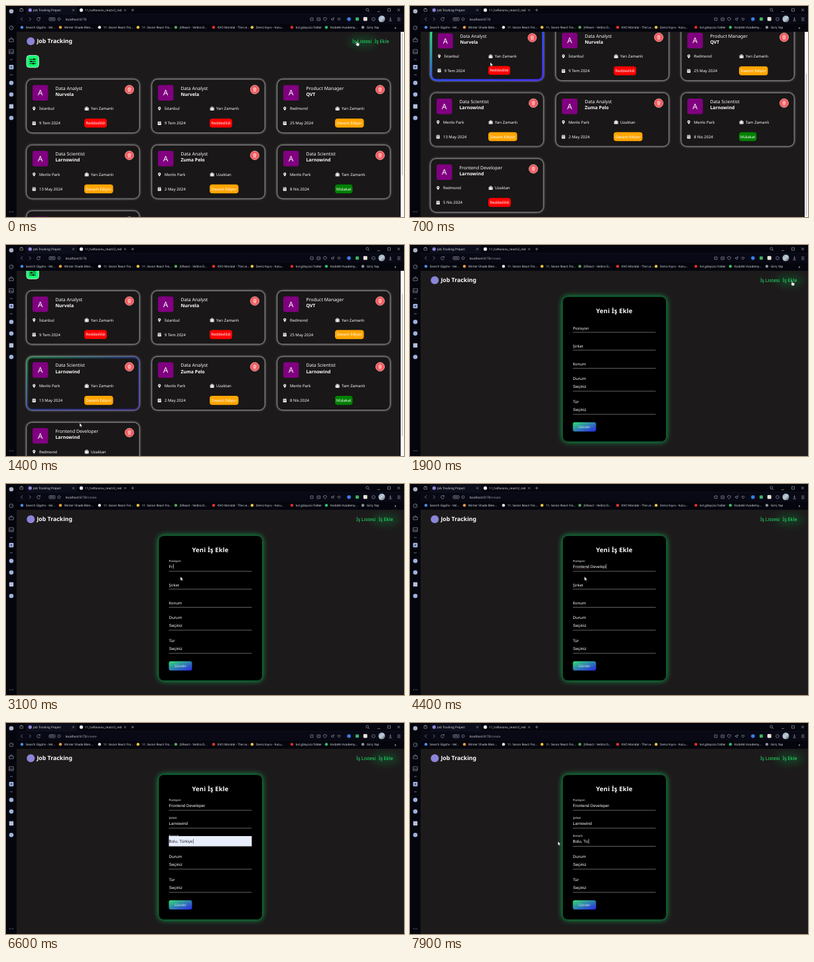
An HTML page that plays this animation: 600 by 319 pixels, repeating every 8 s.

```html
<!DOCTYPE html>
<html lang="tr">
<head>
<meta charset="utf-8">
<title>Job Tracking Project</title>
<style>
html, body { margin: 0; width: 100%; height: 100%; overflow: hidden; background: #1d1a1b; }
svg { display: block; width: 100vw; height: 100vh; font-family: "Noto Sans", sans-serif; font-weight: 500; fill: #fff; text-rendering: geometricPrecision; }
text { white-space: pre; }
.b { font-weight: 700; }
.ui { font-family: "Open Sans", sans-serif; fill: #eceef4; }
.input { font-family: "Liberation Sans", Arial, sans-serif; }
.mid { text-anchor: middle; }
.line { fill: none; stroke: #a9b0c4; stroke-width: .6; }
.nav { fill: #1fee6c; }
.glow { fill: #00c44e; filter: blur(6px); opacity: .2; }
.card { fill: #191717; filter: drop-shadow(0 0 1.6px #d0d0d0) drop-shadow(0 0 1.4px #8a8a8a); }
.panel { fill: #000; stroke: #0b7a3a; stroke-width: .7; filter: drop-shadow(0 0 4px #12a550); }
.ring { fill: none; stroke: url(#hue); stroke-width: 2.8; opacity: 0; }

.scroll, .thumb, .list, .form, .hand, .arrow, .pointer, .hover0, .hover3, .shrink0 { animation: 8s infinite; }
.scroll { animation-name: scroll; }
.thumb { animation-name: thumb; }
.list { animation-name: list; animation-timing-function: step-end; }
.form { animation-name: form; animation-timing-function: step-end; }
.hand { animation-name: hand; animation-timing-function: step-end; }
.arrow { animation-name: arrow; animation-timing-function: step-end; }
.pointer { animation-name: pointer; animation-timing-function: ease-in-out; }
.hover0 { animation-name: hover0; }
.hover3 { animation-name: hover3; }
.shrink0 { animation-name: shrink0; transform-origin: 85px 40px; }

@keyframes scroll {
  0%, 3.5% { transform: translateY(0); }
  7.75%, 13% { transform: translateY(-79px); animation-timing-function: ease-in; }
  17.5% { transform: translateY(-42px); animation-timing-function: ease-out; }
  20%, 100% { transform: translateY(0); }
}
@keyframes thumb {
  0%, 3.5% { transform: translateY(0); }
  7.75%, 13% { transform: translateY(61px); animation-timing-function: ease-in; }
  17.5% { transform: translateY(33px); animation-timing-function: ease-out; }
  20%, 100% { transform: translateY(0); }
}
@keyframes list { 0% { visibility: visible; } 23.1%, 100% { visibility: hidden; } }
@keyframes form { 0% { visibility: hidden; } 23.1%, 100% { visibility: visible; } }
@keyframes hand {
  0% { visibility: visible; } 2.5% { visibility: hidden; }
  22% { visibility: visible; } 28.5%, 100% { visibility: hidden; }
}
@keyframes arrow {
  0% { visibility: hidden; } 2.5% { visibility: visible; }
  22% { visibility: hidden; } 28.5% { visibility: visible; }
  78% { visibility: hidden; } 88.5%, 100% { visibility: visible; }
}
@keyframes pointer {
  0%, 1.5% { transform: translate(528px, 53px); }
  6%, 11% { transform: translate(121px, 85px); }
  13% { transform: translate(112px, 160px); }
  16.5%, 18% { transform: translate(111px, 269px); }
  22.2%, 27% { transform: translate(575px, 54px); }
  32.5%, 34.5% { transform: translate(268px, 125px); }
  37%, 60% { transform: translate(263px, 140px); }
  62%, 71% { transform: translate(262px, 151px); }
  73.5%, 88.5% { transform: translate(264px, 179px); }
  94%, 100% { transform: translate(223px, 179px); }
}
@keyframes hover0 { 0%, 5% { opacity: 0; } 7.5%, 11.5% { opacity: 1; } 14%, 100% { opacity: 0; } }
@keyframes hover3 { 0%, 12% { opacity: 0; } 14%, 15.5% { opacity: 1; } 17.5% { opacity: .4; } 19%, 100% { opacity: 0; } }
@keyframes shrink0 { 0%, 5% { transform: none; } 7.5%, 11.5% { transform: scale(.975); } 14%, 100% { transform: none; } }
</style>
</head>
<body>
<svg id="stage" viewBox="0 0 600 319"></svg>
<script>
const text = (x, y, size, str, cls = '', extra = '') =>
  `<text x="${x}" y="${y}" font-size="${size}" class="${cls}" ${extra}>${str}</text>`;
const box = (x, y, w, h, r, fill, extra = '') =>
  `<rect x="${x}" y="${y}" width="${w}" height="${h}" rx="${r}" fill="${fill}" ${extra}/>`;
const dot = (x, y, r, fill, extra = '') => `<circle cx="${x}" cy="${y}" r="${r}" fill="${fill}" ${extra}/>`;
const line = (d, extra = '') => `<path class="line" d="${d}" ${extra}/>`;
const at = (x, y, inner) => `<g transform="translate(${x} ${y})">${inner}</g>`;

const pin = '<path fill-rule="evenodd" d="M0 3C-1.4 1-2.1.2-2.1-.9A2.1 2.1 0 0 1 2.1-.9C2.1.2 1.4 1 0 3ZM0-1.7A.8.8 0 1 0 0-.1 .8.8 0 1 0 0-1.7Z"/>';
const briefcase = box(-3, -1.8, 6, 4.6, .7, '#fff') +
  '<path d="M-1.2-1.8V-2.8H1.2V-1.8" fill="none" stroke="#fff" stroke-width=".7"/><path d="M-1.6-1.8V2.8M1.6-1.8V2.8" stroke="#191717" stroke-width=".4"/>';
const calendar = box(-2.6, -2.1, 5.2, 5, .6, '#fff') +
  '<path d="M-1.3-3V-1.6M1.3-3V-1.6" stroke="#fff" stroke-width=".7"/><path d="M-2.6-.7H2.6M-1.6.8H1.6" stroke="#191717" stroke-width=".5"/>';
const trash = '<path d="M-2.5-2H2.5M-.8-2V-2.8H.8V-2M-1.9-2L-1.6 2.9H1.6L1.9-2M-.6-.8V1.8M.6-.8V1.8" fill="none" stroke="#fff" stroke-width=".6"/>';

const states = {
  Reddedildi: [34, '#ff0000'],
  'Devam Ediyor': [43.5, '#ffa500'],
  'Mülakat': [26.5, '#008000']
};
const jobs = [
  ['Data Analyst', 'Nurvela', 'İstanbul', 'Yarı Zamanlı', '9 Tem 2024', 'Reddedildi'],
  ['Data Analyst', 'Nurvela', 'İstanbul', 'Yarı Zamanlı', '9 Tem 2024', 'Reddedildi'],
  ['Product Manager', 'QVT', 'Redmond', 'Yarı Zamanlı', '25 May 2024', 'Devam Ediyor'],
  ['Data Scientist', 'Larnowind', 'Menlo Park', 'Yarı Zamanlı', '13 May 2024', 'Devam Ediyor'],
  ['Data Analyst', 'Zuma Pelo', 'Menlo Park', 'Uzaktan', '2 May 2024', 'Devam Ediyor'],
  ['Data Scientist', 'Larnowind', 'Menlo Park', 'Tam Zamanlı', '8 Nis 2024', 'Mülakat'],
  ['Frontend Developer', 'Larnowind', 'Redmond', 'Uzaktan', '5 Nis 2024', 'Reddedildi']
];

function jobCard([title, firm, place, type, date, state], i) {
  const [w, color] = states[state];
  const ring = i === 0 || i === 3 ? box(1, 1, 168.4, 79, 8, 'none', `class="ring hover${i}"`) : '';
  return at(31 + 189 * (i % 3), 111 + 99.5 * Math.floor(i / 3),
    box(.3, .3, 169.4, 79.9, 8, '', 'class="card"') + ring + `<g class="shrink${i}">` +
    box(9, 8.5, 23.5, 23.5, 3, '#800080') + text(20.7, 24.4, 11.5, 'A', 'mid') +
    text(43.4, 15.6, 6.95, title) + text(43.4, 24.8, 6.95, firm, 'b') +
    dot(155, 15.3, 6.6, '#f4585c', 'stroke="#ffc0c0" stroke-width=".7"') + at(155, 15.3, trash) +
    at(11.3, 44.3, pin) + text(19, 46.4, 5.9, place) +
    at(90.7, 44.3, briefcase) + text(97, 46.4, 5.9, type) +
    at(11.3, 66, calendar) + text(19, 68.3, 5.95, date) +
    box(87, 59.2, w, 13.6, 4, color) + text(87 + w / 2, 68.1, 5.9, state, 'mid') + '</g>');
}

const header = (shift, glowX, glowW) =>
  dot(37.3, 53.3, 6, '#8c84d8') + text(46.4, 56.2, 8.75, 'Job Tracking', 'b') +
  `<ellipse class="glow" cx="${glowX}" cy="54" rx="${glowW}" ry="9"/>` +
  text(522 + shift, 55.9, 7.3, 'İş Listesi', 'nav') + text(555.7 + shift, 55.9, 7.3, 'İş Ekle', 'nav');

const filter = box(31, 74.7, 18.4, 18.2, 4, '#12fb70', 'stroke="#e4ffee" stroke-width=".8"') +
  at(40.2, 83.8, '<path d="M-5-3.2H5M-5 0H5M-5 3.2H5" stroke="#111" stroke-width="1"/>' +
    [[2, -3.2], [-2, 0], [1, 3.2]].map(([x, y]) => dot(x, y, 1.4, '#111')).join(''));

const listPage = '<g class="list"><g class="scroll">' + header(0, 538, 22) + filter + jobs.map(jobCard).join('') + '</g>' +
  box(595, 39, 5, 280, 0, '#fafafa') + box(596.5, 41, 1.6, 215, .8, '#c2c2c2', 'class="thumb"') + '</g>';

const fields = [
  { name: 'Pozisyon', y: 132, focus: 2700 },
  { name: 'Şirket', y: 159, focus: 5000 },
  { name: 'Konum', y: 186.4, focus: 5950 }
];
const rule = y => line(`M245.5 ${y}H370.5`, 'style="stroke:#a9a9a9"');
const formPage = '<g class="form">' + header(6, 572, 21) +
  box(230, 78, 156.5, 219.5, 8, '', 'class="panel"') +
  text(308, 103.2, 9.4, 'Yeni İş Ekle', 'b mid', 'letter-spacing=".2"') +
  fields.map(f => `<g class="label">${text(0, 0, 5.8, f.name)}</g>` +
    (f.name === 'Konum' ? box(245.5, 171, 125, 15.2, 0, '#e8eefc', 'id="fill"') : '') +
    rule(f.y) + text(245.5, f.y - 5.3, 6.2, '', 'input typed')).join('') +
  line('M245.5 128.4H270', 'id="spell" style="stroke:#a66;stroke-width:.5;stroke-dasharray:1 .5"') +
  box(0, 0, .6, 7, 0, '#fff', 'id="caret"') +
  [['Durum', 204.4, 221], ['Tür', 239.4, 256]].map(([name, y, end]) =>
    text(245.5, y, 6, name) + text(245.8, end - 5, 6.2, 'Seçiniz', 'input') + rule(end)).join('') +
  box(245.5, 268, 35, 14, 3, 'url(#btn)') + text(263, 276.8, 5.1, 'Gönder', 'mid', 'fill-opacity=".8"') + '</g>';

const marks = [
  [24, '#4f8bea', 'Search Glyphs - Vel...'], [82, '#ee9b3b', 'Winter Shade Blen...'],
  [141, '#eee', '11. Sezon React Fro...'], [199, '#f0c23c', '11. Sezon React Fro...'],
  [256, '#58a55c', 'JSReact - Veldra D...'], [313, '#e5322d', 'KVO Mondal - The Le...'],
  [371, '#e8c24a', 'Deniz Kıyısı - Kutu...'], [431, '#e02a2a', 'kvt gökyüzü folder'],
  [483, '#2fc06c', 'KodaNil Academy...'], [538, '#8a8e9c', 'Giriş Yap']
];
const toolbar = box(0, 0, 600, 39, 0, '#05060d') + box(16, 12.4, 584, 14.6, 0, '#080914') +
  box(30, .5, 77, 12, 1.5, '#0d0e1b') + line('M16 12.5H600', 'style="stroke:#14142a"') +
  line('M21 4.5H25.5V8H21ZM22 3.5H24.5') + dot(36.3, 6.2, 2.6, '#8d82d8') +
  text(41, 8, 4.6, 'Job Tracking Project', 'ui') + line('M100 4.8L103 7.8M103 4.8L100 7.8') +
  dot(113.5, 6.2, 2.6, '#e8e8ee') + text(119, 8, 4.6, '11_haftasonu_react/2_red', 'ui') +
  line('M178 4.8L181 7.8M181 4.8L178 7.8M191 4V8.4M188.8 6.2H193.2') +
  line('M546 7L548 9M560 8.5H564M575.5 4H579.5V8H575.5ZM590 4L594 8M594 4L590 8') + dot(544.7, 5.5, 1.9, 'none', 'class="line"') +
  line('M25 17.3L22.5 19.8L25 22.3M35 17.3L37.5 19.8L35 22.3M51 18.4A2.4 2.4 0 1 0 51.4 20.5M51.4 17V18.8H49.6') +
  box(65, 17.7, 9, 4.4, 1, 'none', 'class="line"') + text(66.2, 21.3, 3.2, 'VPN', 'ui') + dot(80, 19.8, 2, 'none', 'class="line"') +
  text(89.7, 21.6, 4.7, 'localhost:5173<tspan class="form" fill="#9a9cab">/create</tspan>', 'ui') +
  line('M459 18H463V21.8H459ZM469 18H473.5V22H469ZM470.5 20H472M481 17.4L483.3 18.3V20.3L481 22.4L478.7 20.3V18.3ZM490 19.8L494.5 17.8L493 22ZM502 22L499.8 19.6Q500.8 17.4 502 18.9Q503.2 17.4 504.2 19.6Z') +
  dot(517, 19.8, 2.8, '#3d7be8') + box(527, 17.2, 5, 5, 1, '#38b463') + box(538.8, 16.8, 5.8, 5.8, 1, '#eee') +
  line('M540.2 21L543.2 18', 'style="stroke:#c99b25"') + line('M554 17.4L556.2 18.6V21.2L554 22.4L551.8 21.2V18.6Z') +
  dot(566.5, 19.6, 5, 'url(#photo)') + line('M579.5 17V21M577.8 19.4L579.5 21L581.2 19.4M577.3 22.5H581.7M590 18H594.5M590 20H594.5M590 22H594.5') +
  marks.map(([x, color, name]) => dot(x, 32.2, 2.2, color) + text(x + 5.8, 34, 4.6, name, 'ui')).join('') +
  text(585.5, 34.5, 6, '»', 'ui');

const sidebar = box(0, 0, 16, 319, 0, '#05060d') +
  dot(8, 8, 3.3, '#a9b0c4') +
  dot(8, 33, 2.9, 'none', 'class="line"') + line('M8 33.5L10 31.5M4.8 50H11.2V54H4.8ZM6 50L8 47.5L10 50M4.8 66H11.2V72H4.8ZM4.8 71L7 68.6L9 71L11 68.5M6 81H10M6 104H10') +
  box(4.6, 89, 6.8, 6.8, 1, '#9fb0dc') + box(6.8, 91.2, 2.4, 2.4, .3, '#3d4a78') +
  dot(8, 116.3, 3.3, '#9fb0dc') + dot(8, 133.7, 3.3, '#9fb0dc') + box(4.8, 148.5, 6.4, 6.4, .5, '#b4bfdc') + dot(8, 169.3, 3.3, '#9fb0dc') +
  [5.5, 8, 10.5].map(x => dot(x, 311, .6, '#a9b0c4')).join('');

const pointer = '<g class="pointer" id="pointer" stroke="#222" stroke-width=".4">' +
  '<path class="arrow" d="M0 0V6L1.4 4.8L2.3 6.8L3.2 6.4L2.3 4.5H4.2Z"/>' +
  '<path class="hand" d="M.3.4Q1-.3 1.6.4V2.8L4.2 3.4Q4.9 3.7 4.7 5L4 7.6H1.2L-.9 4.9Q-.7 3.9.3 4.6Z"/></g>';

const gradient = (id, stops) => `<linearGradient id="${id}" x2="1" y2="1">` +
  stops.map((c, i) => `<stop offset="${i / (stops.length - 1)}" stop-color="${c}"/>`).join('') + '</linearGradient>';

document.getElementById('stage').innerHTML = '<defs>' +
  gradient('hue', ['#1ef57a', '#2b4cf5', '#4630f0']) + gradient('btn', ['#2fe070', '#2f80b0', '#2b25e8']) +
  gradient('photo', ['#7fa4c9', '#c3ccd4', '#48586c']) + '</defs>' +
  box(0, 0, 600, 319, 0, '#1d1a1b') + listPage + formPage + toolbar + sidebar + pointer;

const $ = id => document.getElementById(id);
const labels = document.querySelectorAll('.label');
const inputs = document.querySelectorAll('.typed');
const clock = $('pointer').getAnimations()[0];
const part = (t, from, to) => Math.min(1, Math.max(0, (t - from) / (to - from)));
const type = (str, t, from, to) => str.slice(0, Math.floor(part(t, from, to) * str.length + .001));

function draw() {
  const t = (clock.currentTime || 0) % 8000;
  const filled = t >= 6400 && t < 7000;
  const values = [
    type('Frontend Developer', t, 2900, 4550),
    type('Larnowind', t, 5150, 5800),
    filled ? 'Bolu, Türkiye' : t < 6400 ? type('Bol', t, 6050, 6350) : type('Bolu, Tü', t, 7050, 7850)
  ];
  let active = -1;
  fields.forEach((f, i) => {
    const up = part(t, f.focus, f.focus + 200);
    labels[i].setAttribute('transform', `translate(245.5 ${f.y - 4.5 - 9.6 * up}) scale(${1 - .24 * up})`);
    inputs[i].textContent = values[i];
    if (t >= f.focus) active = i;
  });
  $('fill').style.display = filled ? '' : 'none';
  inputs[2].style.fill = filled ? '#20232c' : '';
  $('spell').style.display = t >= 3750 && t < 5000 ? '' : 'none';
  const caret = $('caret');
  caret.style.display = active < 0 ? 'none' : '';
  if (active >= 0) {
    caret.setAttribute('x', 246.1 + (values[active] ? inputs[active].getComputedTextLength() : 0));
    caret.setAttribute('y', fields[active].y - 11);
    caret.setAttribute('fill', filled ? '#20232c' : '#fff');
  }
  requestAnimationFrame(draw);
}
draw();
</script>
</body>
</html>
```
